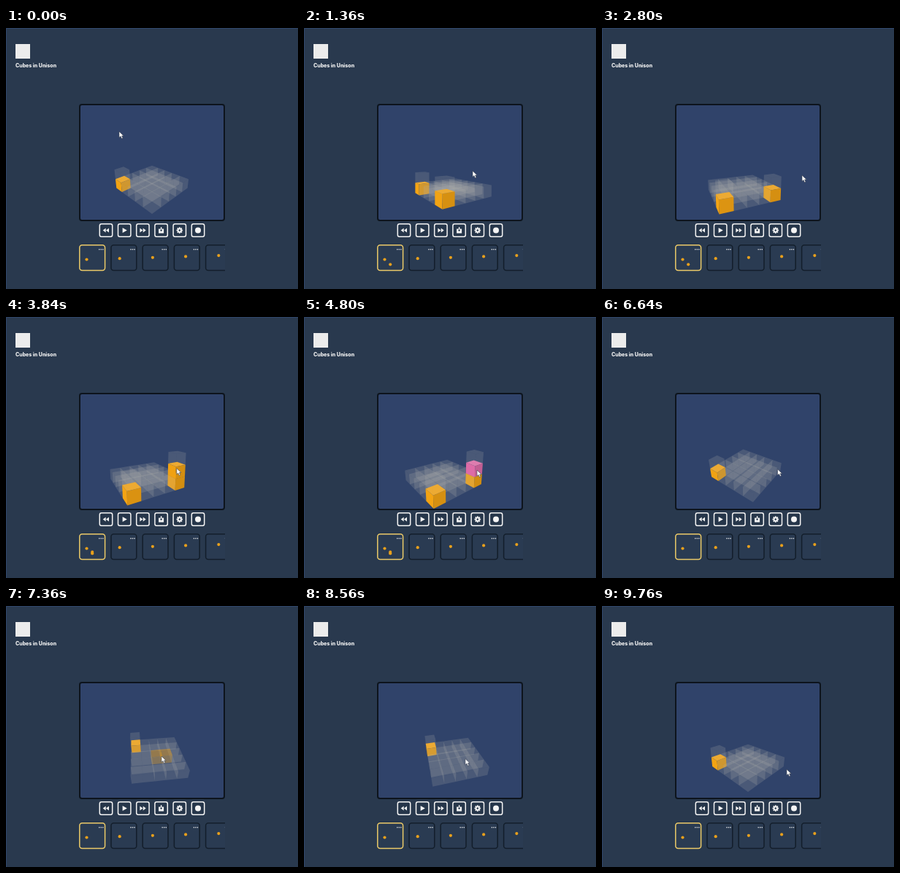
Animation of 400 by 358 pixels, one loop 9840 ms. Source, as an HTML page:

```html
<!DOCTYPE html>
<html lang="en">
<head>
<meta charset="utf-8">
<title>Cubes in Unison</title>
<style>
  html, body { margin: 0; width: 400px; height: 358px; overflow: hidden; background: #29394e; }
  svg { display: block; }
  .caption { font: 800 7px Inter, "Open Sans", sans-serif; fill: #f4f4f4; }
</style>
</head>
<body>
<svg id="stage" width="400" height="358" viewBox="0 0 400 358">
  <defs>
    <clipPath id="view"><rect x="102" y="106" width="196" height="157"/></clipPath>
    <clipPath id="strip"><rect x="98" y="294" width="202" height="42"/></clipPath>
  </defs>
  <rect width="400" height="358" fill="#29394e"/>
  <path d="M.5 358V.5H400" fill="none" stroke="#30466b"/>
  <rect x="13" y="22" width="20" height="20" fill="#ececec"/>
  <text class="caption" x="13" y="54">Cubes in Unison</text>
  <rect x="101" y="105" width="198" height="159" rx="3" fill="#30436a" stroke="#0d141d" stroke-width="2"/>
  <g id="scene" clip-path="url(#view)"></g>
  <g id="buttons"></g>
  <g id="thumbs" clip-path="url(#strip)"></g>
  <path id="cursor" d="M0 0V8.2L2 6.5L3.5 9.8L5 9.1L3.6 5.9H6.2Z" fill="#fff" stroke="#39414f" stroke-width=".6"/>
</svg>
<script>
const LOOP = 9840, STEP = 80;
const N = 5, FOCAL = 172, DIST = 10.8;
const ORANGE = [250, 168, 20], PINK = [232, 112, 176];
const $ = id => document.getElementById(id);

function add(parent, tag, attrs) {
  const el = document.createElementNS("http://www.w3.org/2000/svg", tag);
  for (const k in attrs) el.setAttribute(k, attrs[k]);
  return parent.appendChild(el);
}

// Each move: start, end, then the values reached
const orbit = {
  from: [90, 20],
  moves: [
    [800, 1360, 100, 0.5], [1360, 2320, 20, 8], [3520, 4320, 6, 15],
    [6080, 7040, 128, 36], [8240, 9360, 90, 19]
  ]
};
const pointer = {
  from: [155, 142],
  moves: [
    [0, 560, 198, 240], [800, 1360, 231, 196], [1360, 2320, 274, 202],
    [2800, 3120, 233, 207], [3520, 4640, 237, 210], [5040, 5200, 235, 224],
    [5440, 5840, 263, 211], [6080, 7280, 213, 206], [8240, 9360, 253, 224]
  ]
};

const during = (t, from, to) => t >= from && t < to;
const ease = u => u * u * (3 - 2 * u);

function follow({ from, moves }, t) {
  return moves.reduce((now, [start, end, ...goal]) => {
    const u = ease(Math.min(1, Math.max(0, (t - start) / (end - start))));
    return now.map((v, i) => v + (goal[i] - v) * u);
  }, from);
}

// Camera orbiting the origin; the grid lies below it
function makeProjector([yaw, pitch]) {
  const rad = Math.PI / 180, turn = (yaw - 45) * rad, tilt = pitch * rad;
  const c = Math.cos(turn), s = Math.sin(turn), ct = Math.cos(tilt), st = Math.sin(tilt);
  return ([x, y, z]) => {
    const rx = x * c - z * s, rz = x * s + z * c;
    const up = y * ct - rz * st, depth = DIST - rz * ct - y * st;
    const k = FOCAL / depth;
    return { x: 200 + rx * k, y: 184 - up * k, k, far: Math.hypot(rx, up, depth) };
  };
}

// Corner bits: 1 = x, 2 = y, 4 = z; faces are wound clockwise seen from outside, top first
const faces = [[2, 3, 7, 6], [0, 4, 5, 1], [4, 6, 7, 5], [0, 1, 3, 2], [1, 5, 7, 3], [0, 2, 6, 4]];

function cells(t) {
  const list = [], last = N - 1;
  const second = during(t, 720, 5440), stacked = during(t, 3280, 5040);
  const put = (i, j, k, kind) => list.push({ i, j, k, kind });
  for (let i = 0; i < N; i++) for (let k = 0; k < N; k++) {
    const corner = i === last && k === last;
    if (i === 0 && k === last) {
      put(i, 0, k, "box");
      put(i, 1, k, "free");
    } else if (corner && second) {
      put(i, 0, k, t >= 5200 ? "drop" : "box");
      if (stacked) {
        put(i, 1, k, t >= 4560 ? "drop" : "box");
        put(i, 2, k, "free");
      } else put(i, 1, k, during(t, 3040, 3280) ? "hover" : "free");
    } else {
      const hot = corner && during(t, 480, 720)
        || i === 2 && (k === 1 || k === 2) && during(t, 7200, 8240);
      put(i, 0, k, hot ? "hover" : "free");
    }
  }
  return list;
}

const pool = [];

function drawScene(t) {
  const project = makeProjector(follow(orbit, t));
  const place = (i, j, k) => project([i - 3, j - 3, k - 3]);
  const list = cells(t);
  for (const c of list) c.mid = place(c.i + 0.5, c.j + 0.5, c.k + 0.5);
  list.sort((a, b) => b.mid.far - a.mid.far);
  let used = 0;
  for (const { i, j, k, kind, mid } of list) {
    const pts = Array.from({ length: 8 }, (_, n) => place(i + (n & 1), j + (n >> 1 & 1), k + (n >> 2)));
    faces.forEach((face, f) => {
      const p = face.map(n => pts[n]);
      const area = (p[2].x - p[0].x) * (p[3].y - p[1].y) - (p[2].y - p[0].y) * (p[3].x - p[1].x);
      if (area <= 0) return;
      const el = pool[used] || (pool[used] = add($("scene"), "polygon", {}));
      used++;
      const side = ((p[0].x + p[2].x) / 2 - mid.x) / mid.k;
      const light = f === 0 ? 1 : 0.9 - side * 0.16;
      const solid = kind === "box" || kind === "drop";
      const base = kind === "drop" ? PINK : ORANGE;
      el.setAttribute("points", p.map(q => q.x.toFixed(2) + "," + q.y.toFixed(2)).join(" "));
      el.setAttribute("fill", kind === "free" ? "#b6b4b0" : `rgb(${base.map(v => Math.round(v * light))})`);
      el.setAttribute("fill-opacity", solid ? 1 : kind === "hover" ? 0.42 : 0.2);
      el.setAttribute("display", "inline");
    });
  }
  for (let n = used; n < pool.length; n++) pool[n].setAttribute("display", "none");
}

const icons = [
  "M-.3-3V3L-4.3 0ZM4-3V3L0 0Z",
  "M-2.6-3.5V3.5L3.6 0Z",
  "M-4-3V3L0 0ZM.3-3V3L4.3 0Z",
  "M-3.5-2H-.7V-4.5H.7V-2H3.5V4H-3.5Z",
  "",
  "M-4 0A4 4 0 1 1 4 0A4 4 0 1 1-4 0Z"
];

function buildButtons() {
  icons.forEach((d, n) => {
    const g = add($("buttons"), "g", { transform: `translate(${137 + n * 25.2} 277.5)`, fill: "#f4f4f4" });
    add(g, "rect", { x: -8.7, y: -8.8, width: 17.4, height: 17.6, rx: 2.5, fill: "#26364a", stroke: "#f4f4f4", "stroke-width": 1.5 });
    if (d) add(g, "path", { d });
    else {
      for (let a = 0; a < 180; a += 45)
        add(g, "rect", { x: -0.9, y: -4.3, width: 1.8, height: 8.6, transform: `rotate(${a})` });
      add(g, "circle", { r: 3.1 });
    }
    if (n === 3 || n === 4) add(g, "circle", { r: 1.2, fill: "#26364a" });
  });
}

const dot = (x, y) => add($("thumbs"), "circle", { cx: x, cy: y, r: 2.1, fill: "#e8a01c" });

function buildThumbs() {
  for (let n = 0; n < 5; n++) {
    const x = 100.8 + n * 43.2;
    add($("thumbs"), "rect", {
      x, y: 297.8, width: 34.8, height: 34.8, rx: 3.5, fill: "#2a3b52",
      stroke: n ? "#131e2b" : "#ecca68", "stroke-width": 1.5
    });
    for (let m = 0; m < 3; m++)
      add($("thumbs"), "circle", { cx: x + 27 + m * 2.5, cy: 303.7, r: 0.8, fill: "#f0f0f0" });
    dot(110.5 + n * 45.2, 317.5 - n * 1.35);
  }
}

buildButtons();
buildThumbs();
const lowDot = dot(118.2, 324.3), highDot = dot(118.2, 322.4);

function render(t) {
  drawScene(t);
  lowDot.setAttribute("opacity", during(t, 720, 5440) ? 1 : 0);
  highDot.setAttribute("opacity", during(t, 3280, 5040) ? 1 : 0);
  const [x, y] = follow(pointer, t);
  $("cursor").setAttribute("transform", `translate(${x.toFixed(2)} ${y.toFixed(2)})`);
}

const start = performance.now();
function tick() {
  const t = (performance.now() - start) % LOOP;
  render(Math.floor(t / STEP) * STEP);
  requestAnimationFrame(tick);
}
tick();
</script>
</body>
</html>
```
